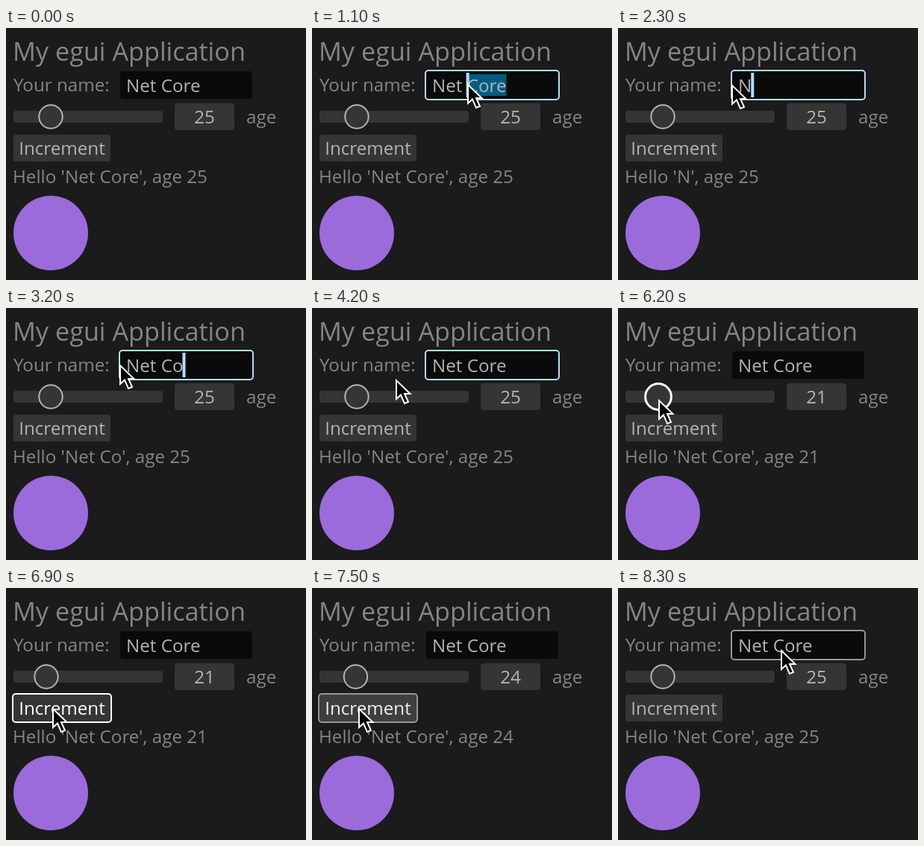
Write an HTML page with a canvas that moves like this. It is 402 px wide and 338 px high and loops after 8400 ms.

```html
<!DOCTYPE html>
<html lang="en">
<head>
<meta charset="utf-8">
<title>My egui Application</title>
<style>
  html, body { margin: 0; height: 100%; overflow: hidden; background: #1b1b1b; }
  canvas { display: block; }
</style>
</head>
<body>
<canvas id="stage" width="402" height="338"></canvas>
<script>
const ctx = document.getElementById('stage').getContext('2d');
const LOOP = 8400, STEP = 100;
const NAME = 'Net Core';
const DIM = '#858585', TEXT = '#b4b4b4', WIDGET = '#353535', HOVER = '#3e3e3e', FOCUS = '#b4dcff';
const FIELD_X = 161, SIZE = 24.2;

// Pointer waypoints: time, x, y
const PATH = [
  [100, 250, 296], [600, 270, 78], [800, 270, 78], [1100, 208, 74], [1500, 152, 75],
  [3900, 152, 75], [4200, 112, 95], [4800, 60, 122], [4900, 60, 122], [5300, 90, 122],
  [5800, 51, 122], [5900, 54, 122], [6400, 54, 122], [6800, 62, 160], [8000, 62, 160],
  [8300, 218, 82]
];
const KEYS = [2100, 2400, 2600, 2800, 3000, 3200, 3400, 3500];
const PRESSES = [6900, 7100, 7300, 7600];

const between = (v, a, b) => v >= a && v < b;
const inside = (p, x, y, w, h) => p && between(p.x, x, x + w) && between(p.y, y, y + h);

function pointerAt(t) {
  if (t < PATH[0][0]) return null;
  const i = PATH.findIndex(k => k[0] >= t);
  if (i === 0) return { x: PATH[0][1], y: PATH[0][2] };
  const [t0, x0, y0] = PATH[i - 1], [t1, x1, y1] = PATH[i];
  const f = (t - t0) / (t1 - t0);
  return { x: x0 + (x1 - x0) * f, y: y0 + (y1 - y0) * f };
}

function ageAt(t, p) {
  if (t < 4900) return 25;
  if (t < 5900) return Math.round((p.x - 22.5) / 1.5);
  return 21 + PRESSES.filter(k => t >= k + STEP).length;
}

function setFont(size) {
  ctx.font = `400 ${size}px "Open Sans", "Noto Sans", sans-serif`;
}

function label(str, x, y, color = DIM, align = 'left', size = SIZE) {
  setFont(size);
  ctx.fillStyle = color;
  ctx.textAlign = align;
  ctx.fillText(str, x, y);
}

function box(x, y, w, h, fill, stroke) {
  ctx.beginPath();
  ctx.roundRect(x, y, w, h, 4);
  ctx.fillStyle = fill;
  ctx.fill();
  if (stroke) outline(stroke, 2);
}

function circle(x, y, r, fill) {
  ctx.beginPath();
  ctx.arc(x, y, r, 0, Math.PI * 2);
  ctx.fillStyle = fill;
  ctx.fill();
}

function outline(color, width) {
  ctx.strokeStyle = color;
  ctx.lineWidth = width;
  ctx.stroke();
}

// x position of the gap before character i
function gapX(str, i) {
  setFont(SIZE);
  return FIELD_X + ctx.measureText(str.slice(0, i)).width;
}

function nearestGap(x) {
  let best = 0;
  for (let i = 1; i <= NAME.length; i++)
    if (Math.abs(gapX(NAME, i) - x) < Math.abs(gapX(NAME, best) - x)) best = i;
  return best;
}

function drawField(t, p, name) {
  const focused = between(t, 800, 4900);
  const hovered = inside(p, 152, 57, 179, 39);
  if (focused || hovered) box(152, 57, 179, 39, '#0a0a0a', focused ? FOCUS : '#969696');
  else box(153, 58, 177, 37, '#0a0a0a');

  const selecting = between(t, 800, 2100);
  const caret = selecting ? nearestGap(p.x) : name.length;
  const x = gapX(name, caret);
  if (selecting) {
    ctx.fillStyle = '#005c80';
    ctx.fillRect(x, 62, gapX(name, NAME.length) - x, 29);
  }
  label(name, FIELD_X, 86, TEXT);

  // The caret blinks off half a second after the last input
  if (between(t, 800, 1800) || between(t, 2100, 4000) || between(t, 4500, 4900)) {
    ctx.fillStyle = FOCUS;
    ctx.fillRect(x - 1, 60, 4, 33);
  }
}

function drawSlider(t, p, age) {
  box(10, 111, 200, 16, WIDGET);
  const held = between(t, 4900, 6300);
  const hovered = inside(p, 10, 101, 200, 36);
  circle(22.5 + age * 1.5, 119, held || hovered ? 17.4 : 15.7, hovered && !held ? HOVER : WIDGET);
  outline(held ? '#fff' : hovered ? '#f0f0f0' : TEXT, held ? 3 : hovered ? 2.5 : 2);
  box(226, 101, 80, 36, WIDGET);
  label(age, 266, 128, TEXT, 'center');
  label('age', 322, 128);
}

function drawButton(t, p) {
  const pressed = PRESSES.some(k => between(t, k, k + STEP));
  const hovered = inside(p, 10, 143, 130, 36);
  if (hovered) box(9, 142, 132, 38, pressed ? WIDGET : HOVER, pressed ? '#fff' : '#969696');
  else box(10, 143, 130, 36, WIDGET);
  label('Increment', 75, 170, pressed ? '#fff' : hovered ? '#f0f0f0' : TEXT, 'center');
}

function drawPointer(p) {
  ctx.save();
  ctx.translate(p.x, p.y);
  ctx.fillStyle = '#000';
  ctx.lineJoin = 'miter';
  const arrow = new Path2D('M1 2V27L7 21.5L12 33L17 31L12 20H19.5Z');
  ctx.fill(arrow);
  ctx.strokeStyle = '#fff';
  ctx.lineWidth = 2;
  ctx.stroke(arrow);
  ctx.restore();
}

function draw(now) {
  const t = Math.floor(now % LOOP / STEP) * STEP;
  const p = pointerAt(t);
  const age = ageAt(t, p);
  const name = t < KEYS[0] ? NAME : NAME.slice(0, KEYS.filter(k => t >= k).length);

  ctx.fillStyle = '#1b1b1b';
  ctx.fillRect(0, 0, 402, 338);
  label('My egui Application', 9, 44, DIM, 'left', 34.2);
  label('Your name:', 10, 85);
  drawField(t, p, name);
  drawSlider(t, p, age);
  drawButton(t, p);
  label(`Hello '${name}', age ${age}`, 9, 208);
  circle(60, 275, 50, '#9b6bdc');
  if (p) drawPointer(p);
}

function tick() {
  draw(performance.now());
  requestAnimationFrame(tick);
}
tick();
</script>
</body>
</html>
```
